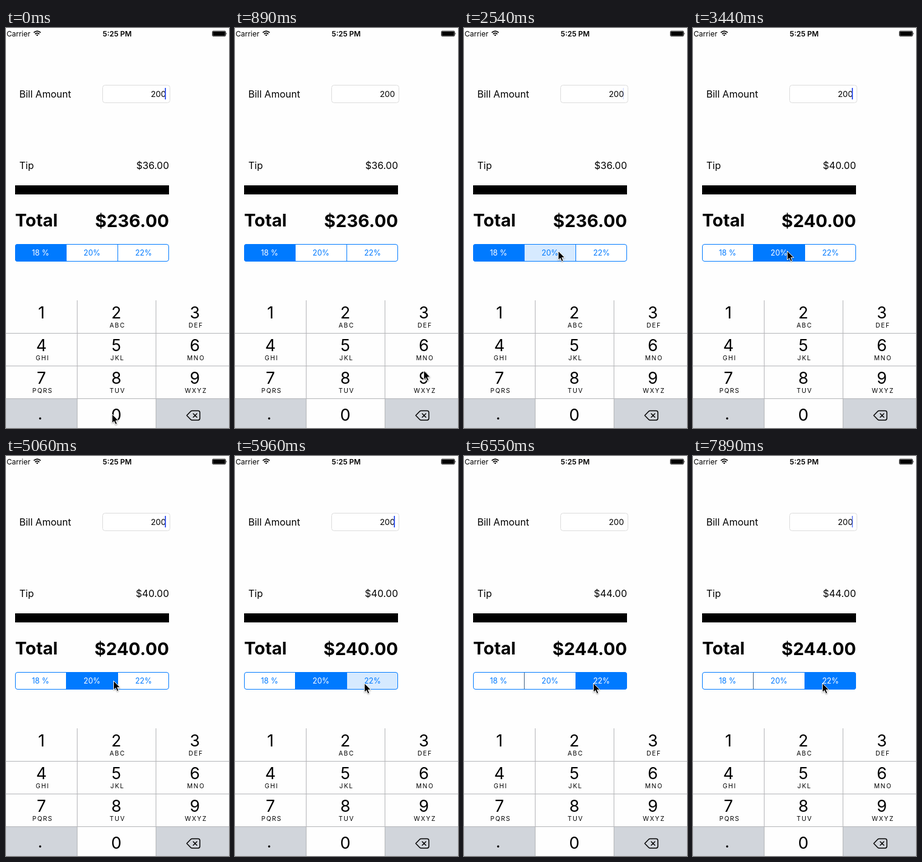
Animation of 368x661 px, one loop 8000 ms. Source, as an HTML page:

```html
<!DOCTYPE html>
<html lang="en">
<head>
<meta charset="utf-8">
<title>Tip calculator</title>
<style>
html, body { margin: 0; width: 100%; height: 100%; overflow: hidden; background: #fefefe; }
svg { display: block; width: 368px; height: 661px; font-family: Inter, "Open Sans", sans-serif; }
.label { font-size: 16px; }
.total { font-size: 29px; font-weight: 700; }
.status { font-size: 12px; }
.segment { font-size: 12.5px; text-anchor: middle; }
.digit { font-size: 27px; text-anchor: middle; }
.letters { font-size: 10.3px; letter-spacing: 1.6px; text-anchor: middle; }
.end { text-anchor: end; }
.line { fill: none; stroke: #000; }
</style>
</head>
<body>
<svg viewBox="0 0 368 661">
  <defs><clipPath id="pill"><rect x="15" y="357" width="254" height="29" rx="4"/></clipPath></defs>

  <!-- status bar -->
  <text class="status" x="1" y="13.5">Carrier</text>
  <g class="line" stroke-width="1.7">
    <path d="M45.8 7.7Q51.5 2.7 57.2 7.7M48 10Q51.5 6.9 55 10"/>
    <path d="M51.5 13.3L49.6 11.4Q51.5 9.9 53.4 11.4Z" fill="#000" stroke="none"/>
  </g>
  <text class="status" x="183.5" y="13.5" font-weight="600" text-anchor="middle">5:25 PM</text>
  <rect class="line" x="340.5" y="5" width="22" height="8.5" rx="1.5" stroke-width=".8"/>
  <rect x="341.3" y="5.8" width="20.4" height="6.9" rx=".8"/>
  <path d="M363.5 7.5Q365.3 9.2 363.5 11Z"/>

  <!-- bill and totals -->
  <text class="label" x="22" y="114.5">Bill Amount</text>
  <rect x="159.5" y="94.5" width="111" height="29" rx="4" fill="#fff" stroke="#dcdcdc"/>
  <text class="end" x="264" y="113.5" font-size="13.4">200</text>
  <rect id="caret" x="262" y="99" width="2" height="19" fill="#4260ee"/>
  <text class="label" x="22" y="232.5">Tip</text>
  <text class="label end" id="tip" x="269" y="232.5"></text>
  <rect x="15" y="260" width="254" height="15"/>
  <text class="total" x="15" y="328">Total</text>
  <text class="total end" id="total" x="269" y="328.5"></text>

  <g id="segments" clip-path="url(#pill)"></g>
  <rect x="15.5" y="357.5" width="253" height="28" rx="3.5" fill="none" stroke="#007aff"/>

  <g id="keypad">
    <path d="M0 612H117V661H0ZM248 612H368V661H248Z" fill="#d1d5db"/>
    <path d="M117.5 450V661M247.5 450V661M0 504.5H368M0 558.5H368M0 612.5H368" stroke="#b4b5b8"/>
    <path class="line" stroke-width="1.5" stroke-linejoin="round" stroke-linecap="round"
      d="M298.3 640.3L304.8 633.6Q305.8 632.6 307.3 632.6H317Q319.9 632.6 319.9 635.5V645.1Q319.9 648 317 648H307.3Q305.8 648 304.8 647ZM309 637.3L315 643.3M315 637.3L309 643.3"/>
  </g>

  <path id="pointer" d="M0 0V15L3.4 11.9L5.8 17.2L8.4 16.1L6.1 10.9H10.8Z" stroke="#fff" stroke-width="1"
    style="filter: drop-shadow(0 1px 1px rgba(0,0,0,.35))"/>
</svg>
<script>
const LOOP = 8000, STEP = 148.95, BLINK = 990;
const $ = id => document.getElementById(id);
const clamp = v => Math.max(0, Math.min(1, v));

function add(parent, tag, attrs, text = '') {
  const el = document.createElementNS('http://www.w3.org/2000/svg', tag);
  for (const key in attrs) el.setAttribute(key, attrs[key]);
  el.textContent = text;
  return parent.appendChild(el);
}

['', 'ABC', 'DEF', 'GHI', 'JKL', 'MNO', 'PQRS', 'TUV', 'WXYZ'].forEach((letters, i) => {
  const x = [58.5, 182, 311.5][i % 3], y = 480 + 54 * Math.floor(i / 3);
  add($('keypad'), 'text', { class: 'digit', x, y }, i + 1);
  add($('keypad'), 'text', { class: 'letters', x: x + 2, y: y + 15 }, letters);
});
add($('keypad'), 'text', { class: 'digit', x: 56.5, y: 647 }, '.');
add($('keypad'), 'text', { class: 'digit', x: 182, y: 649 }, '0');

const segments = ['18 %', '20%', '22%'].map((name, i) => ({
  fill: add($('segments'), 'rect', { x: 15 + 84.67 * i, y: 357, width: 84.67, height: 29 }),
  text: add($('segments'), 'text', { class: 'segment', x: 57 + 85 * i, y: 376 }, name)
}));
const dividers = [99.5, 184.5].map(x =>
  add($('segments'), 'path', { d: `M${x} 357V386`, stroke: '#007aff' }));

// Pointer stops: step, x, y
const stops = [[1, 175, 638], [5, 323, 612], [7, 300, 520], [9, 215, 443], [12, 173.5, 397],
  [15, 155.5, 368.5], [32, 155.5, 368.5], [34, 177.5, 371.5], [38, 213.5, 375.5]];

function pointerAt(step) {
  const next = stops.findIndex(s => s[0] > step);
  if (next < 0) return stops.at(-1).slice(1);
  if (next === 0) return stops[0].slice(1);
  const [a, b] = [stops[next - 1], stops[next]];
  const f = (step - a[0]) / (b[0] - a[0]);
  return [1, 2].map(i => a[i] + (b[i] - a[i]) * f);
}

function caretAt(time) {
  const phase = time % BLINK;
  return phase < 700 ? clamp((570 - phase) / 110) : clamp((phase - 925) / 65);
}

// Tint of a tapped segment and of the one it replaces, by steps since the tap
const rising = [.16, .5, .92, 1], falling = [1, .5, .16, 0];
const blend = (from, to, f) => `rgb(${from.map((v, i) => Math.round(v + (to[i] - v) * f))})`;
const BLUE = [0, 122, 255], WHITE = [255, 255, 255];

function draw(now) {
  const step = Math.floor((now % LOOP + 6) / STEP);
  const target = step >= 40 ? 2 : step >= 17 ? 1 : 0;
  const since = target ? Math.min(3, step - [0, 17, 40][target]) : 3;
  const chosen = since ? target : target - 1;
  const tip = 36 + 4 * chosen;

  $('tip').textContent = `$${tip}.00`;
  $('total').textContent = `$${200 + tip}.00`;
  $('caret').setAttribute('opacity', caretAt(step * 149));
  $('pointer').setAttribute('transform', `translate(${pointerAt(step)})`);

  segments.forEach(({ fill, text }, i) => {
    const tint = i === target ? rising[since] : i === target - 1 ? falling[since] : 0;
    fill.setAttribute('fill', blend(WHITE, BLUE, tint));
    text.setAttribute('fill', blend(BLUE, WHITE, clamp((tint - .16) / .7)));
  });
  dividers[0].setAttribute('stroke', chosen === 2 ? '#3f5f80' : '#007aff');
}

const start = performance.now();
(function tick() {
  draw(performance.now() - start);
  requestAnimationFrame(tick);
})();
</script>
</body>
</html>
```
